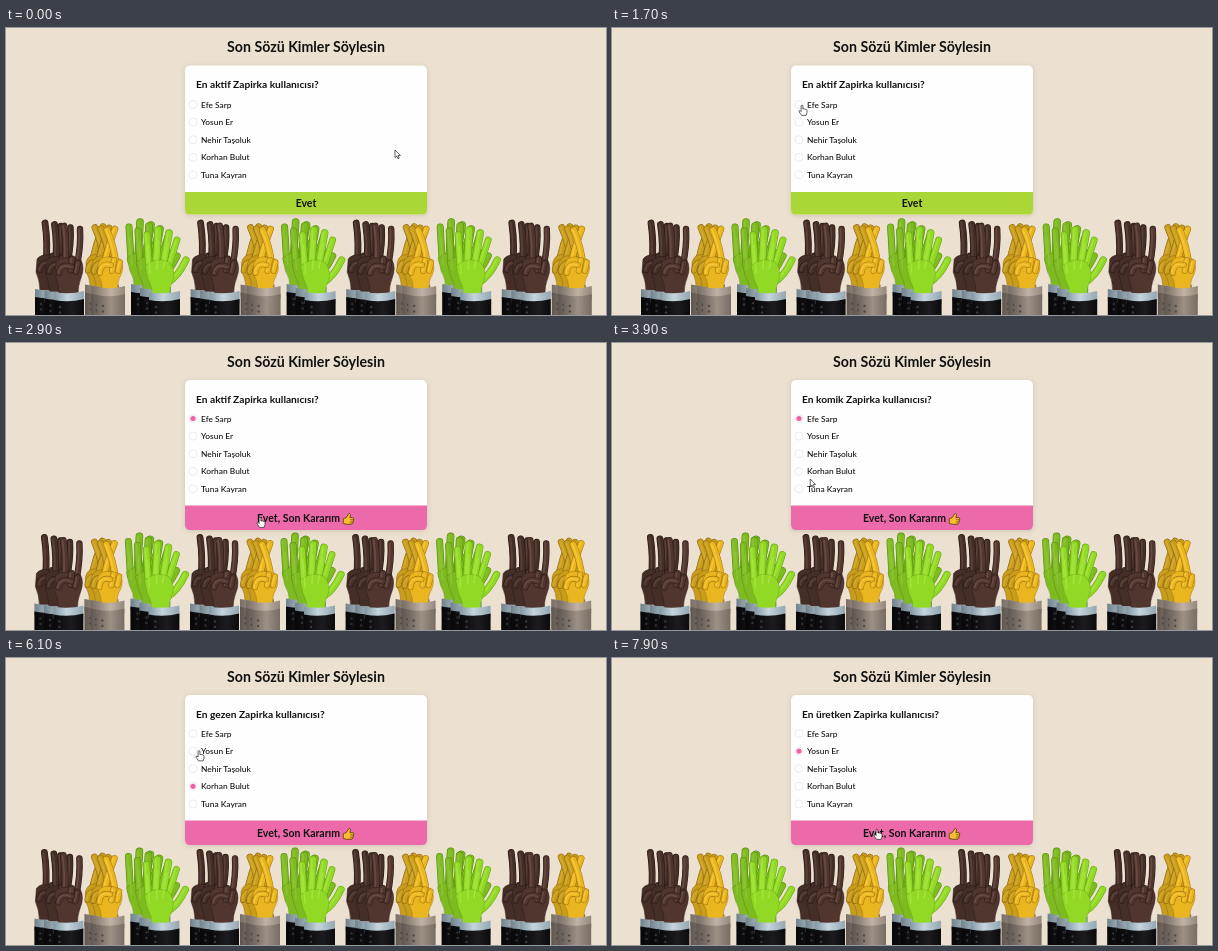
Write an HTML page that moves like this. It is 600 px wide and 287 px high and loops after 8000 ms.

```html
<!DOCTYPE html>
<html lang="tr">
<head>
<meta charset="utf-8">
<title>Anket</title>
<style>
  html, body { margin: 0; width: 100%; height: 100%; overflow: hidden; background: #ece1d1; }
  svg { display: block; width: 600px; height: 287px; }
  text { font-family: Lato, "Open Sans", sans-serif; fill: #111; }
  .title { font-size: 14.2px; font-weight: 700; text-anchor: middle; }
  .question { font-size: 10.2px; font-weight: 700; }
  .option { font-size: 8.4px; font-weight: 500; }
  .action { font-size: 10.5px; font-weight: 700; }
  .behind { filter: brightness(.86); }
  #card { filter: drop-shadow(0 1px 2.5px rgba(90, 70, 40, .2)); }
</style>
</head>
<body>
<svg viewBox="0 0 600 287">
  <defs>
    <linearGradient id="wool" x2="1"><stop stop-color="#6d645d"/><stop offset=".5" stop-color="#9d9085"/><stop offset="1" stop-color="#786d64"/></linearGradient>
    <linearGradient id="woolCuff" x2="1"><stop stop-color="#8b7f75"/><stop offset=".5" stop-color="#c0b2a5"/><stop offset="1" stop-color="#94877c"/></linearGradient>
    <linearGradient id="suit" x2="1"><stop stop-color="#08080a"/><stop offset=".6" stop-color="#1c1c20"/><stop offset="1" stop-color="#0b0b0d"/></linearGradient>
    <linearGradient id="suitCuff" x2="1"><stop stop-color="#8297a3"/><stop offset=".45" stop-color="#c6d5dd"/><stop offset="1" stop-color="#93a6b2"/></linearGradient>
    <filter id="soft" x="-5%" y="-5%" width="110%" height="110%"><feGaussianBlur stdDeviation=".45"/></filter>
    <g id="team"></g>
    <g id="pair"></g>
  </defs>
  <rect width="600" height="287" fill="#ece1d1"/>
  <g id="crowd" filter="url(#soft)"></g>
  <text class="title" x="300" y="24.4">Son Sözü Kimler Söylesin</text>
  <rect id="card" x="179" width="242" rx="5" fill="#fffefe"/>
  <path id="bar"/>
  <text id="question" class="question" x="190"></text>
  <g id="options"></g>
  <text id="plain" class="action" x="300" y="178.7" text-anchor="middle">Evet</text>
  <g id="final">
    <text class="action" x="251" y="179.3">Evet, Son Kararım</text>
    <g transform="translate(336.5 169.8)" stroke="#59390a" stroke-width=".8" stroke-linejoin="round">
      <path fill="#f9bd32" d="M.8 5.7 3.6 5 6 1.2C6.6.1 8.3.7 8 2.2L7.3 4.8H10.4Q11.7 5 11.2 6.4L10.2 10.6Q9.8 11.6 8.4 11.5H4L.8 10.7Z"/>
      <path fill="none" stroke-width=".5" d="M7.7 6.7h3.2M7.5 8.4h3M7.3 10h2.8"/>
    </g>
  </g>
  <g id="cursor" stroke="#222" stroke-width=".7" stroke-linejoin="round" fill="#fff">
    <path id="arrow" d="M0 0V7.6L1.8 6 3 8.7 4.2 8.2 3.1 5.5H5.4Z"/>
    <path id="pointer" d="M-.9.7Q0-.6.9.7V4L2 3.7 2.3 4.1 3.4 4 3.7 4.5Q5 4.3 5 5.5V7.6L4.1 10.4H-.4L-2.9 6.8Q-3.2 5.4-1.9 5.6L-.9 6.6Z"/>
  </g>
</svg>
<script>
const LOOP = 8000;
const $ = id => document.getElementById(id);

// rim, body and light of each skin
const skins = {
  brown: ['#2c1b18', '#50362f', '#856459'],
  yellow: ['#a87610', '#e9b620', '#ffdc58'],
  green: ['#66a512', '#92d925', '#b5ee52']
};

function limb(d, width, [rim, base, light]) {
  const stroke = (color, w, extra = '') =>
    `<path d="${d}" fill="none" stroke="${color}" stroke-width="${w}" stroke-linecap="round" stroke-linejoin="round" ${extra}/>`;
  return stroke(rim, width + .8) + stroke(base, width - .3) +
    stroke(light, width * .3, `opacity=".45" transform="translate(${-width * .16} 0)"`);
}

const palm = (d, [rim, base]) => `<path d="${d}" fill="${base}" stroke="${rim}" stroke-width=".5"/>`;

const buttons = (x, y, color) =>
  [0, 5.5].map(dy => `<circle cx="${x}" cy="${y + dy}" r="1.2" fill="${color}"/>`).join('');

function sleeve(x, y, width, cloth) {
  const piece = (top, bottom, fill) =>
    `<path d="M${x} ${top}Q${x + width / 2} ${top + 3} ${x + width} ${top - 1}V${bottom}H${x}Z" fill="url(#${fill})"/>`;
  return piece(y, y + 12, cloth + 'Cuff') + piece(y + 8, 300, cloth);
}

// Two raised fingers over a fist.
function brownHand() {
  const c = skins.brown;
  return limb('M59 238Q61 218 58 198', 6, c) + limb('M71 237Q75 218 74 201', 5.6, c) +
    palm('M50 234Q54 229 62 230L75 232Q79 240 75 250Q72 257 72 267H53Q53 256 49 247Z', c) +
    limb('M66 231L65 242', 6, c) + limb('M72 235L70 244', 5.2, c) +
    limb('M53 245Q55 235 66 239', 5.4, c) +
    sleeve(48, 264, 30, 'suit') + buttons(54, 279, '#38383e');
}

// Crossed fingers.
function yellowHand() {
  const c = skins.yellow;
  return limb('M98 236Q102 218 109 201', 5.8, c) + limb('M110 236Q108 218 101 202', 6, c) +
    palm('M92 237Q94 228 103 229L114 231Q119 238 115 247Q111 253 112 262H96Q96 252 92 247Z', c) +
    limb('M114 234L112 243', 5, c) + limb('M108 232L106 243', 5.2, c) +
    limb('M94 245Q95 234 105 237', 5, c) +
    sleeve(91, 259, 28, 'wool') + buttons(97, 278, '#554c46');
}

// Open palm with the thumb to the right.
function greenHand() {
  const c = skins.green;
  return limb('M162 254Q172 249 180 232', 6.4, c) +
    limb('M162 240L171 212', 6, c) + limb('M157 238L163 205', 6.8, c) +
    limb('M150 238L152 202', 6.8, c) + limb('M143 241L141 207', 6.2, c) +
    palm('M139 238Q150 228 163 234Q170 242 167 252Q163 259 164 268H146Q147 259 142 251Z', c) +
    `<path d="M144 246L142 217M151 242L152 212M157 241L162 215" fill="none" stroke="${c[2]}" stroke-width="1.6" opacity=".5"/>` +
    sleeve(143, 264, 31, 'suit') + buttons(150, 279, '#38383e');
}

// Three copies of a hand, the rear ones shifted and in shade.
const stack = (hand, dx, dy) => [2, 1, 0].map(i =>
  `<g ${i ? 'class="behind"' : ''} transform="translate(${-dx * i} ${-dy * i})">${hand}</g>`).join('');

const brown = stack(brownHand(), 9.5, 1.5);
const yellow = stack(yellowHand(), 6, 1.2);
const green = stack(greenHand(), 9, 4);
$('pair').innerHTML = yellow + brown;
$('team').innerHTML = green + yellow + brown;
$('crowd').innerHTML = [3, 2, 1, 0].map(i =>
  `<use href="#${i === 3 ? 'pair' : 'team'}" x="${i * 155.6}"/>`).join('');

const names = ['Efe Sarp', 'Yosun Er', 'Nehir Taşoluk', 'Korhan Bulut', 'Tuna Kayran'];
const rowY = i => 76.5 + i * 17.6;
$('options').innerHTML = names.map((name, i) => `
  <circle cx="187" cy="${rowY(i)}" r="4" fill="#fff" stroke="#e4e1e6" stroke-width=".7"/>
  <circle class="dot" cx="187" cy="${rowY(i)}" r="2.6" fill="#ec62a4"/>
  <text class="option" x="195" y="${rowY(i) + 3}">${name}</text>`).join('');
const dots = [...document.querySelectorAll('.dot')];

// time, question word, chosen row, whether the final answer is asked for
const states = [
  [0, 'aktif', -1, false],
  [1900, 'aktif', 0, false],
  [2700, 'aktif', 0, true],
  [3200, 'komik', 0, true],
  [4200, 'komik', 3, false],
  [5000, 'komik', 3, true],
  [5300, 'gezen', 3, true],
  [6400, 'gezen', 1, false],
  [7300, 'gezen', 1, true],
  [7700, 'üretken', 1, true]
];

// time, x, y of the cursor's tip
const route = [
  [0, 389, 122], [900, 203, 83], [1300, 190, 77], [2000, 190, 77],
  [2600, 252, 174], [2900, 254, 174], [3300, 254, 174], [4100, 188, 129],
  [4400, 188, 129], [4800, 237.5, 165.5], [5000, 247, 171], [5400, 247, 171],
  [6100, 193, 92.5], [6250, 189, 93], [6500, 189, 93], [7200, 263, 171],
  [7900, 265, 171], [LOOP, 265, 171]
];

const ease = p => p * p * (3 - 2 * p);

function cursorAt(t) {
  const next = Math.max(1, route.findIndex(p => p[0] > t));
  const [t0, x0, y0] = route[next - 1], [t1, x1, y1] = route[next];
  const p = ease((t - t0) / (t1 - t0));
  return [x0 + (x1 - x0) * p, y0 + (y1 - y0) * p];
}

function isClickable(x, y) {
  const onBar = x > 179 && x < 421 && y > 163 && y < 187;
  const onRow = x > 183 && x < 250 && names.some((_, i) => Math.abs(y - rowY(i)) < 6);
  return onBar || onRow;
}

const show = (node, on) => node.setAttribute('visibility', on ? 'visible' : 'hidden');

function draw(t) {
  const [, word, chosen, final] = states.filter(s => s[0] <= t).pop();
  const lift = final ? .5 : 0;
  const top = 164 - lift * 3, bottom = 186.5 + lift;

  $('card').setAttribute('y', 37.5 - lift);
  $('card').setAttribute('height', bottom - 37.5 + lift);
  $('bar').setAttribute('d', `M179 ${top}H421V${bottom - 5}q0 5-5 5H184q-5 0-5-5Z`);
  $('bar').setAttribute('fill', final ? '#ed6aaa' : '#aad735');
  $('question').setAttribute('y', 60 - lift);
  $('question').textContent = `En ${word} Zapirka kullanıcısı?`;
  $('options').setAttribute('transform', `translate(0 ${-lift * 2})`);
  dots.forEach((dot, i) => show(dot, i === chosen));
  show($('plain'), !final);
  show($('final'), final);
  $('crowd').setAttribute('transform', t < 2700 ? '' : 'translate(-.6 -.6)');

  const [x, y] = cursorAt(t);
  const click = isClickable(x, y);
  $('cursor').setAttribute('transform', `translate(${x} ${y})`);
  show($('arrow'), !click);
  show($('pointer'), click);
}

const start = performance.now();
function tick() {
  draw((performance.now() - start) % LOOP);
  requestAnimationFrame(tick);
}
tick();
</script>
</body>
</html>
```
